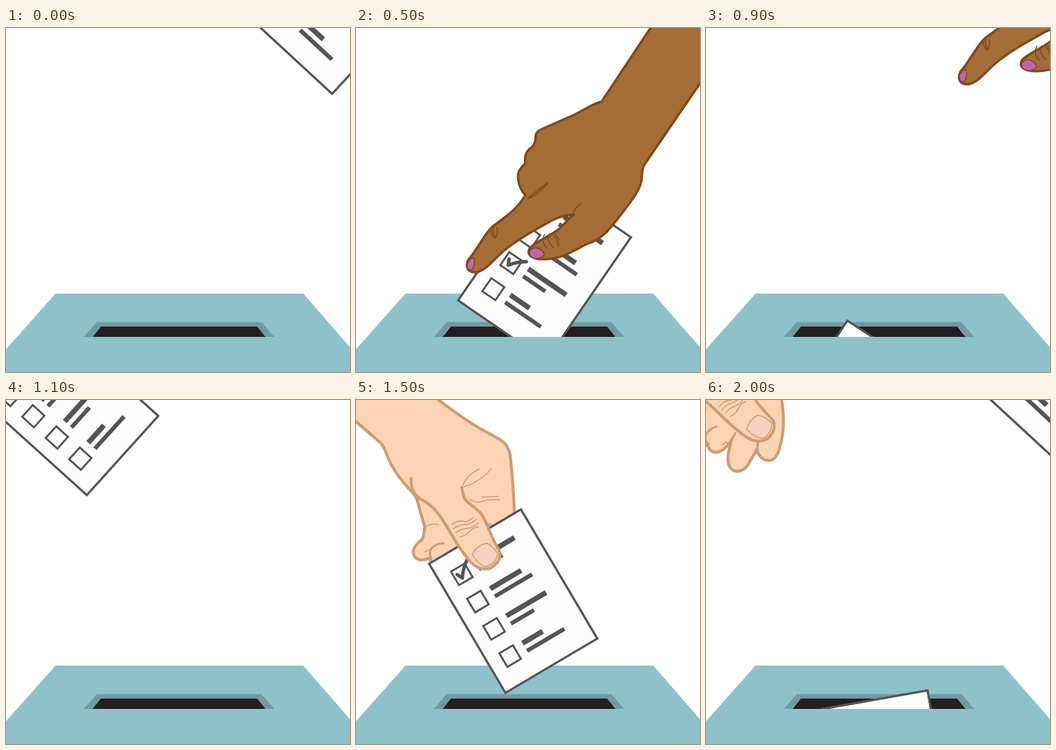
Recreate the animation shown at these times as an HTML page. Size 500 by 500 pixels, loop 2100 ms.

```html
<!DOCTYPE html>
<html lang="en">
<head>
<meta charset="utf-8">
<title>Casting ballots</title>
<style>
  html, body { margin: 0; width: 100%; height: 100%; overflow: hidden; background: #fff; }
  svg { display: block; width: 100%; height: 100%; }
  .ink { fill: none; stroke: #545456; }
  .dark { fill: #a46d35; stroke: #7f4a1e; stroke-width: 3.4; stroke-linejoin: round; }
  .light { fill: #fcd4b4; stroke: #cd9c72; stroke-width: 4.2; stroke-linejoin: round; stroke-linecap: round; }
  .crease { fill: none; stroke-width: 3; }
  .fine { fill: none; stroke-width: 1.5; stroke-linecap: round; }
  .polish { fill: #c365a9; stroke-width: 1.5; }
  .nail { fill: #f6d1c2; stroke-width: 1.5; }
</style>
</head>
<body>
<svg viewBox="0 0 500 500">
  <defs>
    <clipPath id="above"><rect width="500" height="449"/></clipPath>
  </defs>

  <path fill="#8ec2cb" d="M72 386H432L500 464V500H0V467Z"/>
  <path fill="#719ba3" d="M132 427.500H371L390 449H113Z"/>
  <path fill="#231f20" d="M138 434H365L377 449H126Z"/>

  <g clip-path="url(#above)">
    <g id="palm">
      <path class="light" d="M-160 -170L0 13L22 40L54 76C62 86 60 98 67 113C75 134 84 144 92 156
        Q97 163 98 180L102 206Q100 218 96 224C84 231 79 239 81 246C84 254 95 256 105 252
        C101 262 108 270 118 269Q129 268 139 260C126 276 120 286 121 296C124 308 136 310 148 302
        L168 287C164 299 172 310 182 310C192 309 199 298 207 287C221 267 230 236 233 210
        C237 180 238 150 239 125Q240 106 228 96L200 75C172 53 147 27 121 0L-25 -150Z"/>
      <path class="light crease" d="M105 252Q102 243 110 237Q118 233 126 234M139 260L148 253M168 287L173 278"/>
      <path class="light fine" d="M102 207Q112 202 122 206M124 262L130 260L133 265M97 243L104 240
        M163 157Q174 139 192 134M165 157Q192 152 209 136M172 176Q181 183 190 181T215 182M190 175L214 177
        M190 212Q203 221 220 219M193 216Q204 225 214 224"/>
    </g>

    <g id="leftBallot"></g>
    <g id="rightBallot"></g>

    <g id="thumb">
      <path class="light" d="M92 134C88 150 95 163 106 169C130 187 136 223 154 254
        C163 272 173 281 188 279C202 274 208 264 204 253C194 232 194 213 185 197
        C176 186 164 177 164 170L163 157"/>
      <path class="light nail" d="M165 255Q174 243 188 242Q198 248 202 261Q197 274 182 276Q172 272 165 255Z"/>
      <path class="light fine" d="M141 209Q151 203 158 206T174 202M143 215Q152 210 160 211T178 206
        M146 221Q155 216 163 217T180 211M150 228Q159 228 166 222T179 217"/>
    </g>

    <g id="rightHand">
      <path class="dark" d="M570 -214L357 107C340 111 326 124 306 131L270 147Q260 151 261 160
        Q261 170 252 176Q244 183 246 197C236 206 234 212 236 222Q238 234 246 243
        C234 264 215 276 199 288C187 298 178 320 163 337C158 348 163 356 175 355
        C190 352 202 334 216 323C240 303 262 293 284 280Q300 272 317 271
        C306 278 301 290 288 297C273 307 257 313 252 321C248 330 256 337 276 336
        C300 336 318 322 338 313C362 305 374 285 390 265C404 246 412 236 415 222
        C416 208 416 202 421 196L600 -66Z"/>
      <path class="dark polish" d="M162 341Q167 333 171 334Q174 344 168 352Q160 352 162 341Z
        M252 325Q257 318 265 320Q271 323 274 329Q271 335 260 335Q251 333 252 325Z"/>
      <path class="dark fine" d="M279 225Q262 236 249 249Q266 241 279 225M327 255Q318 262 315 271
        M196 291Q195 299 202 306M200 289Q198 297 203 304M205 290Q207 298 203 305
        M274 300Q268 311 278 320M281 299Q276 309 287 319M287 301Q294 308 294 317M290 300L296 308"/>
    </g>
  </g>
</svg>
<script>
const STEP = 100, COUNT = 21;
const $ = id => document.getElementById(id);

// Lengths of the two text lines beside each checkbox.
const LINES = [[68, 40], [52, 63], [67, 39], [34, 63]];

function drawBallot(id, checked) {
  const check = '<path class="ink" stroke-width="5" stroke-linecap="round" stroke-linejoin="round" d="M-6 -3L-2 5Q6 -7 17 -14"/>';
  const rows = LINES.map(([top, bottom], i) => `
    <g transform="translate(-44.500 ${46 * i - 71.5})">
      <rect class="ink" x="-11.500" y="-11.500" width="23" height="23" stroke-width="2.800"/>
      <path class="ink" stroke-width="7.500" d="M25 -7h${top}"/>
      <path class="ink" stroke-width="6" d="M25 6h${bottom}"/>
      ${i === checked ? check : ''}
    </g>`);
  $(id).innerHTML =
    '<rect class="ink" style="fill:#fdfdfd" x="-77.500" y="-109" width="155" height="218" stroke-width="3.200"/>' + rows.join('');
}
drawBallot('leftBallot', 0);
drawBallot('rightBallot', 2);

// Key poses: step, x, y, angle. The last leg speeds up when "accel" is set.
const ballot = (accel, ...keys) => ({ pivot: [0, 0], accel, keys });
const leftHand = { pivot: [184, 261], keys: [
  [10, -15, -127, -27], [13, 121, 118, -21], [16, 222, 282, -1], [17, 184, 261, 0], [20, 79, 41, -23]] };

const actors = {
  rightBallot: ballot(true, [20, 525, -46, 42.7], [21, 491, -37, 42.7], [24, 332.5, 247.5, 39.3],
    [26, 274, 350, 34.5], [30, 211, 559, 33]),
  rightHand: { pivot: [263, 328], accel: true, keys: [
    [0, 483, -70, 15], [3, 321, 217, 9.5], [5, 263, 328, 0], [10, 586, -99, 0]] },
  leftBallot: ballot(false, [10, 45, -75, -50], [13, 175.5, 173, -43.8], [16, 255, 352, -24],
    [17, 252, 406, -20.7], [20, 264.6, 543, -10]),
  palm: leftHand,
  thumb: leftHand
};

function poseAt({ keys, accel }, step) {
  const s = step < keys[0][0] ? step + COUNT : step;
  const i = keys.findIndex(key => key[0] >= s);
  if (i < 0) return null;
  if (i === 0) return keys[0].slice(1);
  const from = keys[i - 1], to = keys[i];
  let k = (s - from[0]) / (to[0] - from[0]);
  if (accel && i === keys.length - 1) k *= k;
  return from.map((v, j) => v + (to[j] - v) * k).slice(1);
}

function show(step) {
  for (const [id, actor] of Object.entries(actors)) {
    const pose = poseAt(actor, step), el = $(id);
    el.style.display = pose ? '' : 'none';
    if (!pose) continue;
    const [x, y, angle] = pose, [px, py] = actor.pivot;
    el.setAttribute('transform', `translate(${x} ${y}) rotate(${angle}) translate(${-px} ${-py})`);
  }
}

const origin = performance.now();
function tick() {
  const t = Math.max(0, performance.now() - origin);
  show(Math.floor(t / STEP) % COUNT);
  requestAnimationFrame(tick);
}
tick();
</script>
</body>
</html>
```
